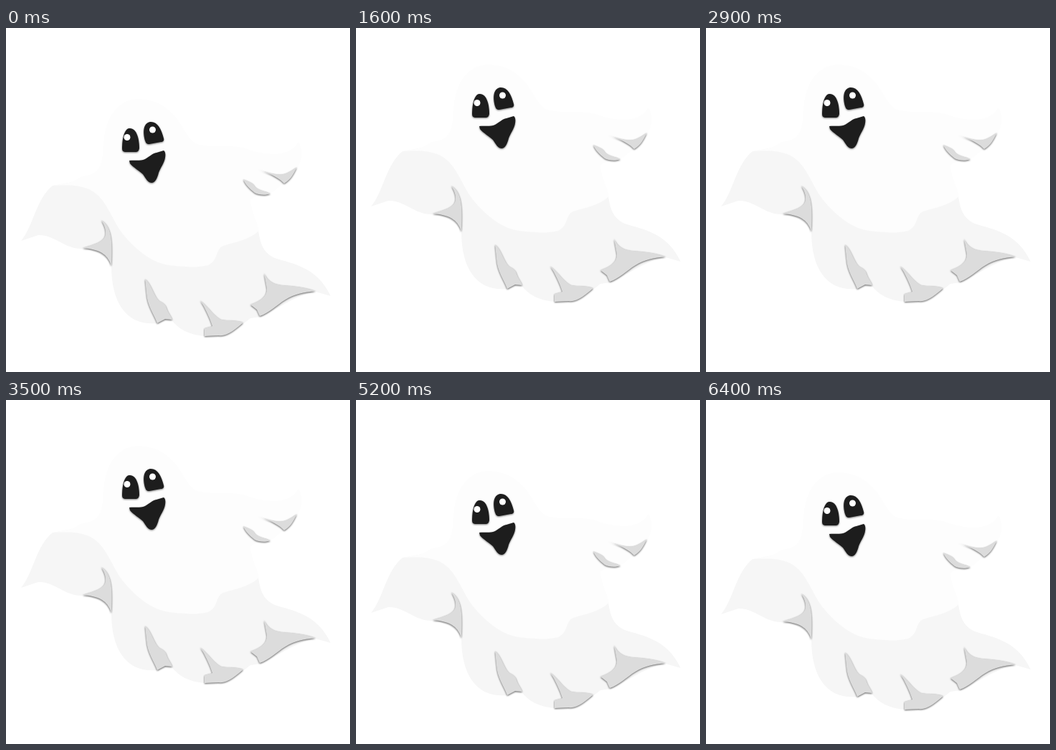
An HTML page without scripts that plays this animation: 480x480 px, repeating every 6500 ms.

```html
<!DOCTYPE html>
<html lang="en">
<head>
<meta charset="utf-8">
<title>Floating ghost</title>
<style>
  html, body { margin: 0; width: 100%; height: 100%; overflow: hidden; background: #fff; }
  svg { display: block; width: 100vw; height: 100vh; }

  /* Quick rise, slower sink, in thirteen held steps. */
  .ghost { animation: bob 1300ms step-end -4ms infinite; }
  @keyframes bob {
    0% { transform: translateY(0); }
    7.692% { transform: translateY(-13px); }
    15.385% { transform: translateY(-32px); }
    23.077% { transform: translateY(-48px); }
    30.769% { transform: translateY(-66px); }
    38.462% { transform: translateY(-82px); }
    46.154% { transform: translateY(-72px); }
    53.846% { transform: translateY(-61px); }
    61.538% { transform: translateY(-47px); }
    69.231% { transform: translateY(-35px); }
    76.923% { transform: translateY(-22px); }
    84.615% { transform: translateY(-10px); }
    92.308%, 100% { transform: translateY(2px); }
  }

  .cloth { fill: #f6f6f6; }
  .body { fill: #fdfdfd; }
  .folds { fill: #dcdcdc; filter: drop-shadow(.5px 1px 1px rgba(0, 0, 0, .6)); }
  .face { fill: #1d1d1d; filter: drop-shadow(.5px 1px 1px rgba(0, 0, 0, .5)); }
  .glints { fill: #fff; }
</style>
</head>
<body>
<svg viewBox="0 0 480 480">
  <g class="ghost">
    <path class="cloth" d="M21 297C38 277 42 238 65 220L120 210L340 250L352 283C355 300 358 313 375 321
      C400 329 434 333 453 374L432 368C405 372 380 392 355 403L341 405C325 418 305 431 277 430
      C255 428 240 420 231 407L211 412C170 416 147 386 147 332C138 316 124 310 107 308
      C82 309 68 288 45 289Z"/>
    <path class="body" d="M65 220C78 217 92 218 105 207C128 205 133 195 135 175C136 158 137 140 145 125
      C154 108 168 99 184 99C211 99 229 113 241 130C251 144 256 160 270 163C300 168 316 161 340 170
      C365 178 395 181 408 159C416 172 412 190 404 199C400 209 393 215 386 218
      C376 225 375 229 369 230C357 235 347 233 341 240C342 255 350 268 353 283
      C337 297 320 298 303 304C292 308 297 324 282 331C268 335 242 333 228 331
      C205 328 184 312 166 291C148 271 142 239 118 226C100 218 82 219 65 220Z"/>
    <g class="folds">
      <path d="M133 268C147 277 149 295 147 332C143 319 135 309 107 307C122 302 139 299 139 286C139 280 137 275 133 268Z"/>
      <path d="M194 350C203 357 206 374 214 381C219 383 223 386 224 391C226 397 230 401 232 407L222 406L211 412C207 400 197 388 196 370Z"/>
      <path d="M271 380C283 390 290 402 300 407C310 409 322 407 331 411C322 419 308 431 297 429L277 430L277 419L288 416C284 404 278 391 271 380Z"/>
      <path d="M360 342C364 350 369 357 385 359C402 360 418 362 432 367C415 369 403 371 390 379C377 387 367 398 354 402L350 393L341 386C355 381 364 375 364 364Z"/>
      <path d="M331 211C337 214 344 215 347 221C352 227 361 227 369 231C362 234 353 233 347 230C340 224 334 219 331 211Z"/>
      <path d="M351 197C363 201 377 206 387 204C395 202 400 198 406 194C401 204 398 211 388 217C383 211 372 204 351 197Z"/>
    </g>
    <g class="face">
      <path d="M162 168C162 158 164 141 172 140C182 139 186 154 186 168C185 172 184 173 180 173L168 173C163 173 162 171 162 168Z"/>
      <path d="M194 157C191 146 191 133 201 131C211 130 217 141 220 154C221 157 219 159 216 159L200 162C196 162 195 160 194 157Z"/>
      <path d="M172 185C179 184 187 186 194 183C201 179 204 175 210 174L220 171C222 172 223 176 222 181C221 188 215 196 213 202C211 210 208 216 203 216C197 215 196 211 191 204C186 199 178 195 173 189Z"/>
    </g>
    <g class="glints">
      <circle cx="169" cy="152.5" r="4.5"/>
      <circle cx="204.5" cy="142" r="4.5"/>
    </g>
  </g>
</svg>
</body>
</html>
```
